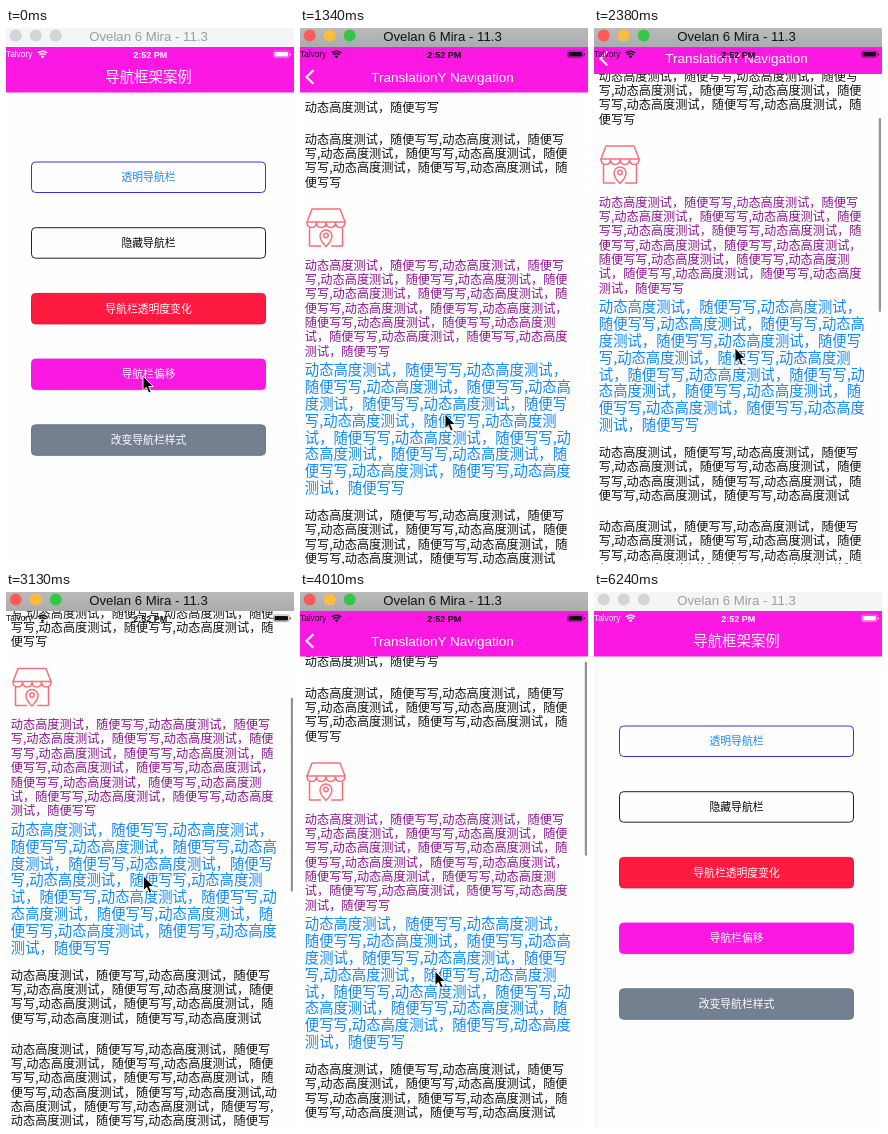
These frames come from a looping animation (288 px wide and 536 px high, 6340 ms). An HTML page:

```html
<!DOCTYPE html>
<html lang="zh-CN">
<head>
<meta charset="utf-8">
<title>导航框架案例</title>
<style>
  html, body { margin: 0; width: 100%; height: 100%; overflow: hidden; background: #fff; }
  svg { display: block; width: 100%; height: 100%; }
  text { font-family: "Liberation Sans", "Noto Sans CJK SC", "Noto Sans CJK", sans-serif; white-space: pre; }
  .cjk { font-family: "Noto Sans CJK SC", "Noto Sans CJK", sans-serif; }
</style>
</head>
<body>
<svg id="stage" viewBox="0 0 288 536">
  <defs>
    <clipPath id="screen"><rect y="19" width="288" height="517"/></clipPath>
    <linearGradient id="chrome" x2="0" y2="1">
      <stop offset="0" stop-color="#bababa"/>
      <stop offset="1" stop-color="#acacac"/>
    </linearGradient>
  </defs>
  <g clip-path="url(#screen)">
    <g id="home">
      <rect y="19" width="288" height="517" fill="#fefefe"/>
    </g>
    <rect id="dim" y="19" width="288" height="517"/>
    <rect id="strip" y="65" width="5" height="471" fill="#f9f9f9"/>
    <g id="detail">
      <rect y="19" width="288" height="517" fill="#fefefe"/>
      <g id="content">
        <g fill="none" stroke="#f8707a" stroke-width="1.5" stroke-linejoin="round" stroke-linecap="round">
          <path d="M12 181H40L45 194H7Z"/>
          <path d="M7 194q0 5.5 4.75 5.5t4.75-5.5q0 5.5 4.75 5.5t4.75-5.5q0 5.5 4.75 5.5t4.75-5.5q0 5.5 4.75 5.5t4.75-5.5"/>
          <path d="M9.5 200V218H20.5M31.5 218H42.5V200"/>
          <path d="M26 218.5q-6-6-6-10.5a6 6 0 0 1 12 0q0 4.500-6 10.500z"/>
          <circle cx="26" cy="207.500" r="2.200"/>
        </g>
      </g>
    </g>
    <rect id="thumb" x="284.800" width="2.200" height="194" rx="1.100" fill="#000"/>
    <g id="bar">
      <rect y="19" width="288" height="45.500" fill="#fb18e3"/>
      <text id="homeTitle" class="cjk" x="142.500" y="54" font-size="14.400" fill="#fff" text-anchor="middle">导航框架案例</text>
      <text id="detailTitle" x="142.500" y="53.700" font-size="13.500" fill="#fff" text-anchor="middle">TranslationY Navigation</text>
      <path id="back" d="M13.300 42.300L6.500 49L13.300 55.700" fill="none" stroke="#fff" stroke-width="2.100"/>
    </g>
    <g id="status">
      <text x="0" y="29.400" font-size="8.300">Talvory</text>
      <text x="144.300" y="29.600" font-size="9" font-weight="700" text-anchor="middle">2:52 PM</text>
      <path d="M36.500 30.300l-1.700-1.900a2.500 2.500 0 0 1 3.400 0z"/>
      <path d="M33.500 27a4.300 4.300 0 0 1 6 0M31.900 25.100a6.600 6.600 0 0 1 9.200 0" fill="none" stroke="currentColor" stroke-width="1.400"/>
      <rect x="267.500" y="23" width="15.500" height="6.600" rx="1.600" fill="none" stroke="currentColor" stroke-width=".6" opacity=".6"/>
      <rect x="268.500" y="24" width="13.500" height="4.600" rx=".8"/>
      <rect x="283.700" y="25.200" width="1" height="2.200" rx=".5"/>
    </g>
  </g>
  <rect id="frame" width="288" height="19"/>
  <g id="lights"></g>
  <text id="caption" x="142.500" y="12.900" font-size="13.200" text-anchor="middle">Ovelan 6 Mira - 11.3</text>
  <path id="cursor" d="M0 0V14.500L3.300 11.400L5.700 17L8.200 16L5.800 10.500H10.300Z" fill="#000" stroke="#fff" stroke-width=".9"/>
</svg>
<script>
const $ = id => document.getElementById(id);
const LOOP = 6340, START = 746, TICK = 148.3;

function add(parent, tag, attrs, text = "") {
  const node = document.createElementNS("http://www.w3.org/2000/svg", tag);
  for (const name in attrs) node.setAttribute(name, attrs[name]);
  node.textContent = text;
  return parent.appendChild(node);
}

function set(id, attrs) {
  for (const name in attrs) $(id).setAttribute(name, attrs[name]);
}

// Home page buttons: label, fill, border, label colour
[
  ["透明导航栏", "#fefefe", "#3a30d8", "#1688ff"],
  ["隐藏导航栏", "#fefefe", "#222", "#000"],
  ["导航栏透明度变化", "#ff1a40", "#e01a3c", "#fff"],
  ["导航栏偏移", "#fb18e3", "#fb18e3", "#fff"],
  ["改变导航栏样式", "#747f90", "#6c7688", "#fff"]
].forEach(([label, fill, stroke, color], i) => {
  const y = 134 + i * 65.7;
  add($("home"), "rect", { x: 25.5, y, width: 234, height: 30.5, rx: 4, fill, stroke });
  add($("home"), "text", { class: "cjk", x: 142.5, y: y + 19.3, "font-size": 10.8, fill: color, "text-anchor": "middle" }, label);
});

// Break a paragraph so that no line starts with a comma
function wrap(text, size, limit = 268) {
  const width = s => [...s].reduce((sum, c) => sum + (c === "," ? 0.278 : 1) * size, 0);
  const lines = [];
  let line = "";
  for (const c of text) {
    if (width(line + c) > limit) {
      const keep = "，,".includes(c) ? line.length - 1 : line.length;
      lines.push(line.slice(0, keep));
      line = line.slice(keep);
    }
    line += c;
  }
  return [...lines, line];
}

function paragraph(text, y, size = 12.2, step = 14.35, fill = "#111") {
  wrap(text, size).forEach((line, i) =>
    add($("content"), "text", { class: "cjk", x: 4.8, y: y + i * step, "font-size": size, fill }, line));
}

const phrase = "动态高度测试，随便写写";
const repeat = n => Array(n).fill(phrase).join(",");
const cut = repeat(7) + ",动态高度测试";
paragraph(phrase, 84.1);
paragraph(repeat(6), 115.7);
paragraph(repeat(12), 241.6, 12.2, 14.35, "#8a168f");
paragraph(repeat(12), 347.4, 14.35, 16.8, "#1086ff");
paragraph(cut, 492.1);
paragraph(cut + "," + repeat(4), 566.1);

const lights = [9.7, 29.7, 49.7].map(cx => add($("lights"), "circle", { cx, cy: 7.6, r: 6 }));
const lightColors = ["#fc5b57", "#fdbc3e", "#33c748"];

// Keys are [tick, value]
const scrollKeys = [[5, 0], [11, 63], [16, 104.5], [17, 102], [22, 10], [24, 7.5]];
const cursorX = [[0, 137], [4, 145], [11, 141], [16, 137.5], [22, 135], [23, 135], [27, 10], [33, 10], [36, -14]];
const cursorY = [[0, 348], [4, 386], [11, 320], [16, 284], [22, 379], [23, 379], [27, 49], [33, 49], [36, 62]];
const thumbKeys = [[5, 0], [6, 0.42], [24, 0.42], [26, 0]];

const clamp = (v, lo = 0, hi = 1) => Math.min(hi, Math.max(lo, v));

function track(keys, k) {
  if (k <= keys[0][0]) return keys[0][1];
  for (let i = 1; i < keys.length; i++) {
    const [a, from] = keys[i - 1], [b, to] = keys[i];
    if (k <= b) return from + (to - from) * (k - a) / (b - a);
  }
  return keys[keys.length - 1][1];
}

const slide = (k, from) => 1 - (1 - clamp((k - from) / 3)) ** 3;
const move = (x, y = 0) => `translate(${x.toFixed(2)} ${y.toFixed(2)})`;

function draw(ms) {
  // The screen refreshes in even ticks
  const k = Math.max(-1, Math.floor((ms - START) / TICK));
  const open = slide(k, 0.5) - slide(k, 29.5);
  const scroll = track(scrollKeys, k);
  const lift = clamp(scroll - 44.5, 0, 45.5);
  const active = k >= 0 && k < 37;
  const dark = k >= 1 && k < 30;
  const ink = dark ? "#111" : "#fff";

  set("home", { transform: move(-86 * open) });
  set("dim", { opacity: 0.1 * open });
  set("strip", { opacity: k >= 33 ? 1 : 0 });
  set("detail", { transform: move(288 * (1 - open)), visibility: open > 0.001 ? "visible" : "hidden" });
  set("content", { transform: move(0, -scroll) });
  set("thumb", { y: 66 + 0.38 * scroll, opacity: track(thumbKeys, k) });

  set("bar", { transform: move(0, -lift) });
  set("homeTitle", { transform: move(-100 * open), opacity: clamp(1 - open * 1.3) });
  set("detailTitle", { transform: move(130 * (1 - open)), opacity: clamp(open * 1.3 - 0.3) });
  set("back", { opacity: open * (k >= 29 ? 0.3 : 1) });
  set("status", { fill: ink, color: ink });

  set("frame", { fill: active ? "url(#chrome)" : "#f5f5f5" });
  set("caption", { fill: active ? "#111" : "#9c9c9c" });
  lights.forEach((dot, i) => dot.setAttribute("fill", active ? lightColors[i] : "#d4d4d4"));
  set("cursor", { transform: move(track(cursorX, k), track(cursorY, k)) });
}

let began;
function frame(now) {
  began ??= now;
  draw((now - began) % LOOP);
  requestAnimationFrame(frame);
}
draw(0);
requestAnimationFrame(frame);
</script>
</body>
</html>
```
